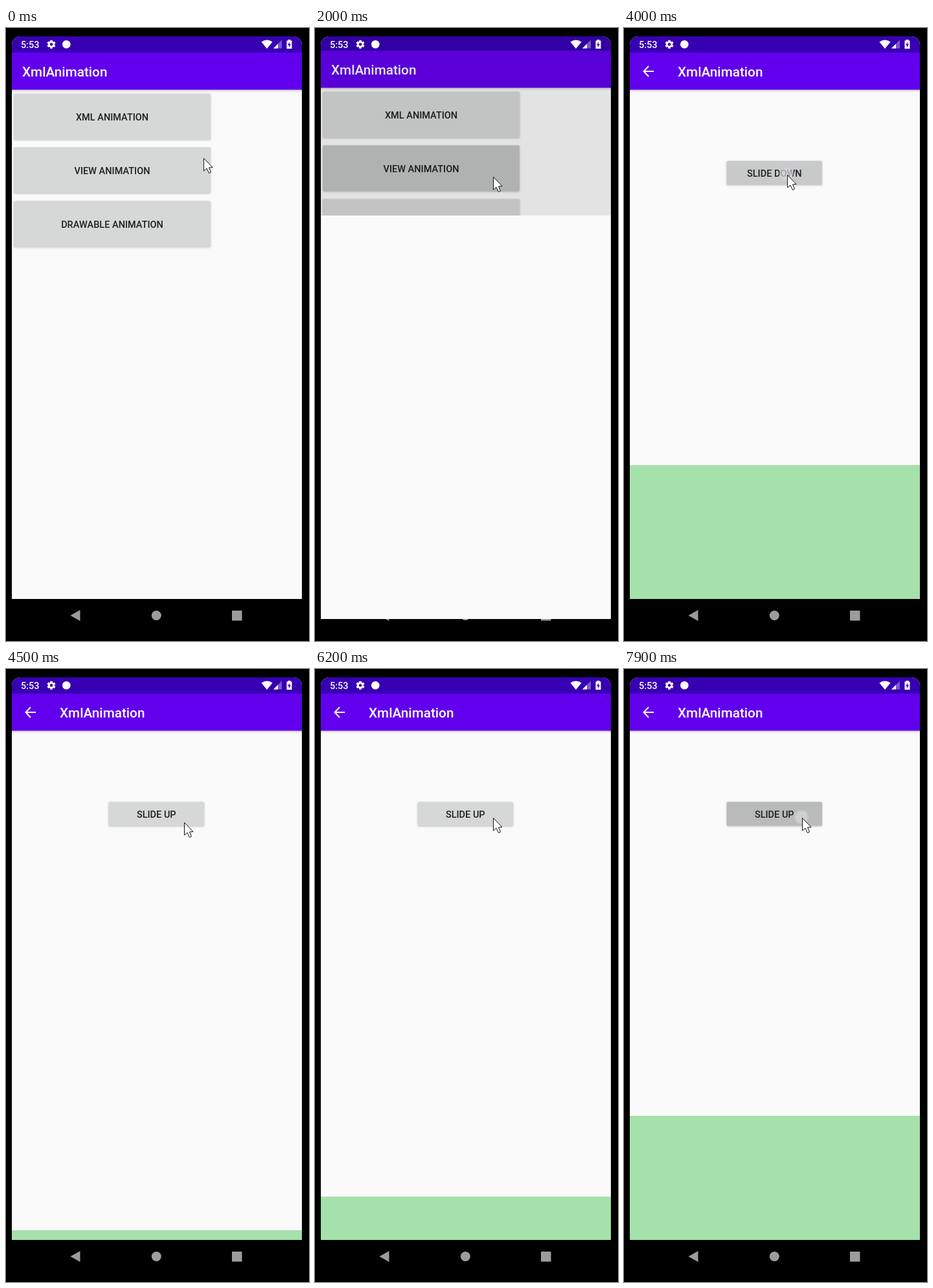
Animation of 468x948 px, one loop 8 s. Source, as an HTML page with a canvas:

```html
<!DOCTYPE html>
<html lang="en">
<head>
<meta charset="utf-8">
<title>XmlAnimation</title>
<style>
  html, body { margin: 0; width: 468px; height: 948px; overflow: hidden; background: #000; }
  canvas { display: block; }
</style>
</head>
<body>
<canvas id="stage" width="468" height="948"></canvas>
<script>
const ctx = document.getElementById('stage').getContext('2d');
const LOOP = 8000, STEP = 100;
const SCREEN = { left: 9, top: 13, width: 448, bottom: 883, fullHeight: 921 };
const PANEL_HEIGHT = 207, SLIDE_MS = 500, OPEN_AT = 1902, OPEN_MS = 425, HOME_PRESS = 1700;

// Each tap: when the finger goes down, and when the panel begins to slide.
const taps = [[3100, 3132], [4000, 4087], [4900, 5027], [5800, 5893], [6800, 6930], [7700, 7814]];

// Pointer path: time, x, y
const pointerPath = [
  [0, 305, 201], [500, 225, 208], [700, 225, 208], [800, 223, 208], [1000, 223, 208],
  [1100, 223, 212], [1800, 223, 212], [2000, 275, 230], [2500, 261, 221], [2900, 252, 227],
  [4200, 252, 227], [4500, 275, 237], [4700, 275, 230], [LOOP, 275, 230]
];

const clamp = v => Math.min(1, Math.max(0, v));
const lerp = (a, b, k) => a + (b - a) * k;

function bezierEase(x0, y0, x1, y1, x2, y2, x3, y3) {
  const at = (a, b, c, d, s) =>
    a * (1 - s) ** 3 + 3 * b * s * (1 - s) ** 2 + 3 * c * s * s * (1 - s) + d * s ** 3;
  return x => {
    let lo = 0, hi = 1;
    for (let i = 0; i < 24; i++) {
      const mid = (lo + hi) / 2;
      if (at(x0, x1, x2, x3, mid) < x) lo = mid; else hi = mid;
    }
    return at(y0, y1, y2, y3, lo);
  };
}
const fastOutSlowIn = bezierEase(0, 0, 0.4, 0, 0.2, 1, 1, 1);
const extraHead = bezierEase(0, 0, 0.05, 0, 0.1333, 0.06, 0.1667, 0.4);
const extraTail = bezierEase(0.1667, 0.4, 0.2083, 0.82, 0.25, 1, 1, 1);
const fastOutExtraSlowIn = x => (x < 0.1667 ? extraHead(x) : extraTail(x));
const accelerateDecelerate = x => (1 - Math.cos(Math.PI * x)) / 2;

function rect(x, y, w, h, fill) {
  ctx.fillStyle = fill;
  ctx.fillRect(x, y, w, h);
}

function polygon(points, fill, stroke) {
  ctx.beginPath();
  points.forEach(([x, y]) => ctx.lineTo(x, y));
  ctx.closePath();
  ctx.fillStyle = fill;
  ctx.fill();
  if (stroke) { ctx.strokeStyle = stroke; ctx.lineWidth = 1; ctx.stroke(); }
}

function circle(x, y, r, fill) {
  ctx.beginPath();
  ctx.arc(x, y, r, 0, Math.PI * 2);
  ctx.fillStyle = fill;
  ctx.fill();
}

function text(label, x, y, size, fill, align = 'left') {
  ctx.font = `500 ${size}px Roboto, sans-serif`;
  ctx.textAlign = align;
  ctx.fillStyle = fill;
  ctx.fillText(label, x, y);
}

function button(label, x, y, w, h, press) {
  ctx.save();
  ctx.shadowColor = 'rgba(0,0,0,.22)';
  ctx.shadowBlur = 3;
  ctx.shadowOffsetY = 1;
  const [r, g, b] = [[214, 185], [215, 187], [215, 186]].map(([a, z]) => lerp(a, z, press));
  ctx.fillStyle = `rgb(${r},${g},${b})`;
  ctx.beginPath();
  ctx.roundRect(x, y, w, h, 2);
  ctx.fill();
  ctx.restore();
  text(label, x + w / 2, y + h / 2 + 5.5, 14.5, '#1f1f1f', 'center');
}

// Quick darkening on touch, then fade back.
function pressAmount(age) {
  if (age < 0 || age >= 400) return 0;
  return age < 100 || age >= 300 ? 0.5 : 1;
}

function appWindow(titleX) {
  const { left, top, width, bottom } = SCREEN;
  rect(left, top, width, bottom - top, '#fafafa');
  const shade = ctx.createLinearGradient(0, 95, 0, 100);
  shade.addColorStop(0, 'rgba(0,0,0,.16)');
  shade.addColorStop(1, 'rgba(0,0,0,0)');
  rect(left, 95, width, 5, shade);
  rect(left, top, width, 25, '#3700b3');
  rect(left, 38, width, 57.5, '#6200ee');
  text('XmlAnimation', titleX, 74.5, 20.74, '#fff');
}

function homePage(t) {
  appWindow(25);
  button('XML ANIMATION', 12, 101.5, 304, 71, 0);
  button('VIEW ANIMATION', 12, 184.5, 304, 71, t >= HOME_PRESS ? 0.7 : 0);
  button('DRAWABLE ANIMATION', 12, 267.5, 304, 71, 0);
}

function detailPage(t) {
  appWindow(83);
  ctx.strokeStyle = '#fff';
  ctx.lineWidth = 2;
  ctx.beginPath();
  ctx.moveTo(46, 67); ctx.lineTo(31, 67);
  ctx.moveTo(38, 59); ctx.lineTo(30.5, 67); ctx.lineTo(38, 75);
  ctx.stroke();

  const started = taps.filter(([, start]) => t >= start);
  const raised = started.length % 2 === 1;
  let shown = 0;
  if (started.length) {
    const k = accelerateDecelerate(clamp((t - started.at(-1)[1]) / SLIDE_MS));
    shown = Math.round(PANEL_HEIGHT * (raised ? k : 1 - k));
  }
  rect(SCREEN.left, SCREEN.bottom - shown, SCREEN.width, shown, '#a5e1aa');
  const press = Math.max(...taps.map(([down]) => pressAmount(t - down)));
  button(raised ? 'SLIDE DOWN' : 'SLIDE UP', 158.5, 205.5, 147.5, 37, press);
}

function statusIcons() {
  text('5:53', 23, 30.5, 14.5, '#fff');

  ctx.save();
  ctx.translate(70, 25.3);
  for (let i = 0; i < 6; i++) {
    rect(-1.8, -6.5, 3.6, 4, '#fff');
    ctx.rotate(Math.PI / 3);
  }
  ctx.restore();
  ctx.strokeStyle = '#fff';
  ctx.lineWidth = 2.6;
  ctx.beginPath();
  ctx.arc(70, 25.3, 3.7, 0, Math.PI * 2);
  ctx.stroke();
  circle(93.3, 25.3, 6.3, '#fff');

  ctx.beginPath();
  ctx.moveTo(403, 32);
  ctx.lineTo(394.5, 21.5);
  ctx.quadraticCurveTo(403, 15.5, 411.5, 21.5);
  ctx.fillStyle = '#fff';
  ctx.fill();
  polygon([[413, 31.5], [426, 31.5], [426, 18.5]], 'rgba(255,255,255,.35)');
  polygon([[413, 31.5], [420, 31.5], [420, 24.5]], '#fff');

  rect(433.5, 19.5, 8, 12.5, '#fff');
  rect(435.5, 18, 4, 2, '#fff');
  polygon([[438.2, 21.5], [435, 26.5], [437, 26.5], [436.8, 30.2], [440, 25], [438, 25]], '#3700b3');
}

function navIcons() {
  const grey = '#9c9c9c';
  polygon([[99.5, 908.5], [114.5, 900], [114.5, 917]], grey);
  circle(232.3, 908.5, 7.5, grey);
  rect(349, 901, 15.5, 15.5, grey);
}

function pages(t) {
  const { left, top, width, fullHeight } = SCREEN;
  const progress = clamp((t - OPEN_AT) / OPEN_MS);
  ctx.save();
  ctx.beginPath();
  ctx.roundRect(left, top, width, fullHeight, [13, 13, 0, 0]);
  ctx.clip();
  const move = fastOutSlowIn(progress);
  if (progress < 1) {
    ctx.save();
    ctx.translate(0, Math.round(-18 * move));
    homePage(t);
    ctx.restore();
    const dim = t < OPEN_AT ? 0 : 0.1 * fastOutExtraSlowIn(clamp((t - OPEN_AT) / 217));
    rect(left, top, width, SCREEN.bottom - top, `rgba(0,0,0,${dim})`);
  }
  if (progress > 0) {
    const hidden = fullHeight * (1 - fastOutExtraSlowIn(progress));
    ctx.translate(0, Math.round(38 * (1 - move)));
    ctx.beginPath();
    ctx.rect(left, Math.round(top + hidden), width, fullHeight);
    ctx.clip();
    detailPage(t);
  }
  ctx.restore();
}

function pointerAt(t) {
  const i = pointerPath.findIndex(([time]) => time > t);
  const [t0, x0, y0] = pointerPath[i - 1], [t1, x1, y1] = pointerPath[i];
  const k = (t - t0) / (t1 - t0);
  return [Math.round(lerp(x0, x1, k)), Math.round(lerp(y0, y1, k))];
}

function pointer(t) {
  const [x, y] = pointerAt(t);
  const touching = [HOME_PRESS, ...taps.map(([down]) => down)].some(down => t >= down && t < down + 250);
  if (touching) {
    circle(x - 1, y - 1, 11.5, 'rgba(205,203,215,.45)');
    circle(x - 1, y - 1, 9.5, 'rgba(222,222,226,.45)');
  }
  const arrow = [[0, 0], [0, 19.5], [4.5, 15.5], [8, 23], [11, 21.5], [8, 14.5], [13.5, 14]];
  polygon(arrow.map(([dx, dy]) => [x + 0.5 + dx, y + 0.5 + dy]), '#fff', '#111');
}

function draw(now) {
  const t = Math.floor((now % LOOP) / STEP) * STEP;
  rect(0, 0, 468, 948, '#000');
  navIcons();
  pages(t);
  statusIcons();
  pointer(t);
  requestAnimationFrame(draw);
}

const startTime = performance.now();
requestAnimationFrame(function first() { draw(0); });
const baseDraw = draw;
draw = () => baseDraw(performance.now() - startTime);
</script>
</body>
</html>
```
